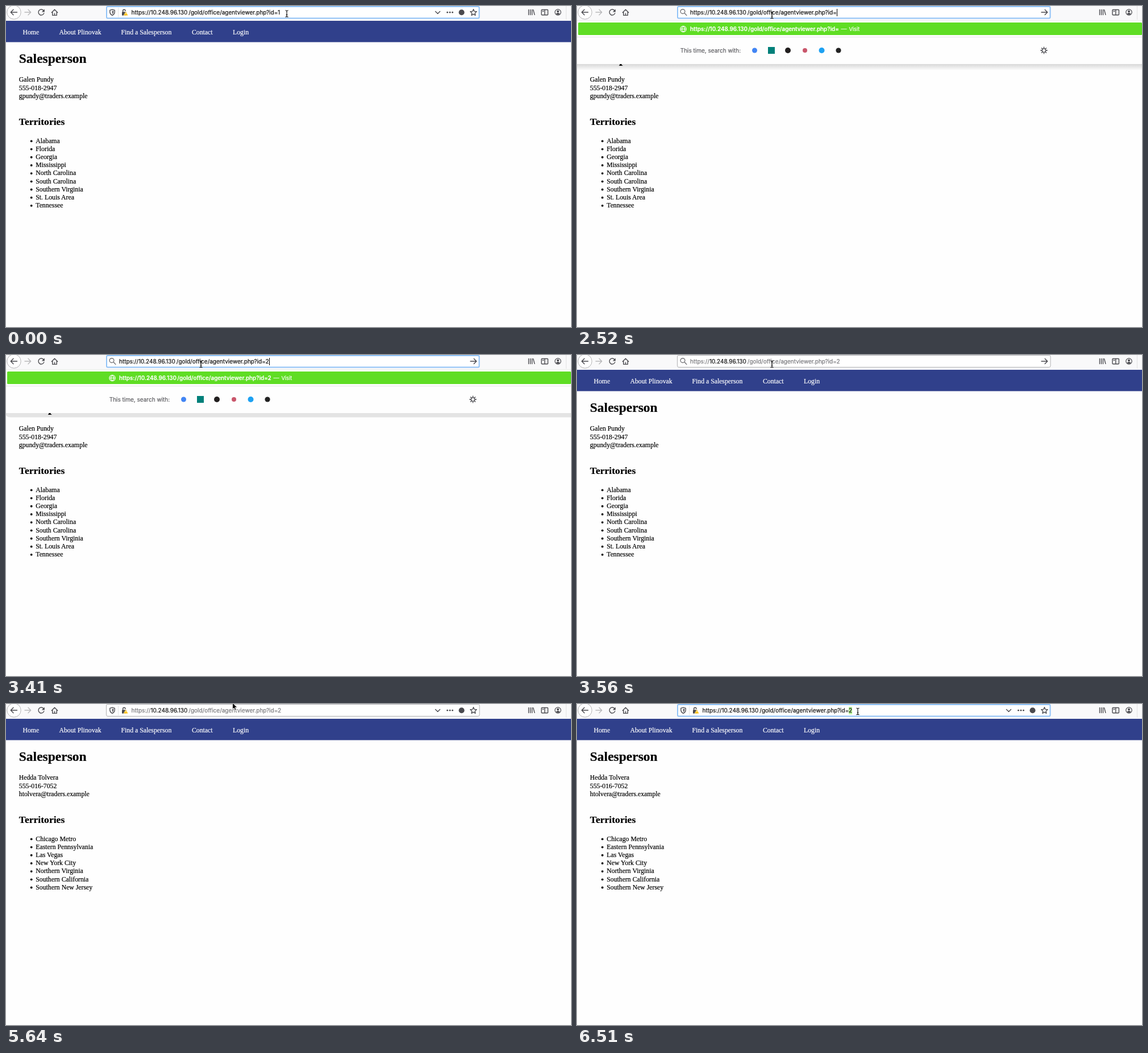
An HTML page for the animation above (8000 ms loop, 994 by 564 pixels).

```html
<!DOCTYPE html>
<html lang="en">
<head>
<meta charset="utf-8">
<title>Salesperson</title>
<style>
  html, body { margin: 0; width: 100%; height: 100%; overflow: hidden; background: #fff; }
  svg { display: block; }
  text { white-space: pre; stroke-width: .2; }
  .page { font: 11.76px "Liberation Serif", "Times New Roman", serif; stroke: #000; }
  .ui { font: 10px Inter, sans-serif; }
  .strong { font-size: 9.8px; font-weight: 600; }
  .line { fill: none; stroke: #4a4a4f; stroke-width: 1.4; stroke-linecap: round; stroke-linejoin: round; }
</style>
</head>
<body>
<svg id="stage" width="994" height="564" viewBox="0 0 994 564"></svg>
<script>
const LOOP = 8000;
const INK = '#111', ICON = '#4a4a4f';
const stage = document.getElementById('stage');

const people = [
  { name: 'Galen Pundy', phone: '555-018-2947', mail: 'gpundy@traders.example',
    areas: ['Alabama', 'Florida', 'Georgia', 'Mississippi', 'North Carolina', 'South Carolina',
      'Southern Virginia', 'St. Louis Area', 'Tennessee'] },
  { name: 'Hedda Tolvera', phone: '555-016-7052', mail: 'htolvera@traders.example',
    areas: ['Chicago Metro', 'Eastern Pennsylvania', 'Las Vegas', 'New York City',
      'Northern Virginia', 'Southern California', 'Southern New Jersey'] }
];

// Each step overrides the state left by the steps before it.
const steps = [
  [0, { person: 0, id: '1', mode: 'site', focus: true, button: 'reload', cursor: [494, 13.5],
        panel: 0, caret: false, mark: '', hover: true }],
  [1340, { cursor: [385, 13.5] }],
  [1490, { cursor: [289.3, 15] }],
  [1630, { cursor: [343, 16] }],
  [2520, { mode: 'typing', id: '', panel: 1, caret: true, shadow: 'soft' }],
  [2670, { panel: 5 }],
  [2810, { panel: 1, id: '2', caret: false, shadow: 'firm' }],
  [3410, { caret: true }],
  [3560, { panel: 0, caret: false, focus: false }],
  [3700, { button: 'stopSmall' }],
  [3850, { button: 'stop', mode: 'site' }],
  [4000, { button: 'stopDim', person: 1 }],
  [4150, { button: 'stopFade' }],
  [4300, { button: 'reloadDim' }],
  [4440, { button: 'reloadMid' }],
  [4590, { button: 'reload' }],
  [5640, { cursor: [398.5, -2], pointer: true }],
  [5780, { cursor: null, hover: false }],
  [5930, { cursor: [477, 6.5], pointer: false, hover: true }],
  [6080, { cursor: [491.5, 12.5] }],
  [6220, { focus: true }],
  [6370, { cursor: [494, 13], mark: 'all' }],
  [6510, { mark: 'id' }]
];
const states = [];
steps.forEach(([, change], i) => states.push({ ...states[i - 1], ...change }));

const rect = (x, y, w, h, fill, more = '') =>
  `<rect x="${x}" y="${y}" width="${w}" height="${h}" fill="${fill}" ${more}/>`;
const dot = (x, y, r, fill, more = '') => `<circle cx="${x}" cy="${y}" r="${r}" fill="${fill}" ${more}/>`;
const line = (d, more = '') => `<path class="line" d="${d}" ${more}/>`;
const label = (x, y, s, more = '') => `<text x="${x}" y="${y}" ${more}>${s}</text>`;
const paint = color => `style="stroke:${color}"`;
const inked = color => `fill="${color}" stroke="${color}"`;

function address(x, y, id, colors, scale = 1, look = '') {
  const parts = [['https://', 0], ['10.248.96.130', 34], ['/gold/office/agentviewer.php', 100.8],
    ['?id=', 237.5], [id, 257.5]];
  return `<text y="${y}" class="ui ${look}">` + parts.map(([s, dx], i) =>
    `<tspan x="${x + dx * scale}" ${inked(colors[i === 1 ? 1 : 0])}>${s}</tspan>`).join('') + '</text>';
}

function page(person) {
  const nav = [['Home', 29.5], ['About Plinovak', 93.5], ['Find a Salesperson', 202.5],
    ['Contact', 327], ['Login', 399]];
  const rows = person.areas.map((s, i) => {
    const y = 240.6 + i * 14.18;
    return dot(44.7, y - 3.2, 1.9, '#000', 'stroke="none"') + label(52.3, y, s);
  }).join('');
  return rect(0, 26, 994, 37.5, '#30408b') + '<g class="page">' +
    nav.map(([s, x]) => label(x, 49.5, s, inked('#fff'))).join('') +
    label(22.8, 99.6, 'Salesperson', 'font-size="23.5" font-weight="700"') +
    [person.name, person.phone, person.mail].map((s, i) => label(22.8, 133.4 + i * 14.1, s)).join('') +
    label(22.8, 209.4, 'Territories', 'font-size="17.6" font-weight="700"') + rows + '</g>';
}

function loadButton(kind) {
  const stop = (r, color) => line(`M${62 - r} ${11 - r}l${2 * r} ${2 * r}M${62 + r} ${11 - r}l${-2 * r} ${2 * r}`, paint(color));
  const reload = (color, tip = color) =>
    line('M66.2 8.2A5 5 0 1 0 66.8 12.6', paint(color)) +
    `<path d="M67.8 5.6v5h-5z" fill="${tip}"/>`;
  return {
    reload: () => reload(ICON),
    reloadMid: () => reload(ICON, '#a8a8aa'),
    reloadDim: () => reload('#a8a8aa', '#d8d8da'),
    stop: () => stop(4.5, ICON),
    stopSmall: () => stop(3.2, '#77777b'),
    stopDim: () => stop(4.5, '#b9b9bb'),
    stopFade: () => stop(3.2, '#cfcfd1')
  }[kind]();
}

function toolbar(s) {
  return rect(0, 0, 994, 26, '#f9f9fa') + rect(985, 0, 1, 24, '#e3e3e5') +
    dot(14, 11, 12.2, '#fff', 'stroke="#b4b4b6"') +
    line('M19.5 11H8.5M13 6.3L8.3 11l4.7 4.7') +
    line('M33 11h10.5M39 6.3l4.7 4.7l-4.7 4.7', paint('#b9b9bb')) + loadButton(s.button) +
    line('M80.3 11.4L85.5 6.2l5.2 5.2M81.8 11v5.4h7.4V11M85.5 16v-3') +
    line('M919.5 6.5v9M922.5 6.5v9M925.5 6.5v9M927.6 6.8l2.3 8.6') +
    line('M943 6.5h9.4q1 0 1 1v7.2q0 1-1 1H943q-1 0-1-1V7.500q0-1 1-1zM947.8 7v8.500M944.2 9.200h1.600', 'stroke-width="1.2"') +
    dot(971, 11, 5.2, 'none', `stroke="${ICON}" stroke-width="1.2"`) +
    dot(971, 9.4, 2, ICON) + `<path d="M967.3 13.7q3.7-3.6 7.4 0q-3.7 3.4-7.4 0" fill="${ICON}"/>`;
}

function siteIcons() {
  const star = Array.from({ length: 10 }, (_, i) => {
    const a = i * Math.PI / 5, r = i % 2 ? 2.7 : 5.9;
    return `${(822.4 + r * Math.sin(a)).toFixed(2)} ${(11.6 - r * Math.cos(a)).toFixed(2)}`;
  }).join('L');
  return line('M187 6.2l4.2 1.2v3.2q-.3 4-4.2 5.8q-3.9-1.8-4.2-5.8V7.4z', 'stroke-width="1.2"') +
    `<path d="M187 8.2v6q2-1.4 2.2-4V8.8z" fill="${ICON}"/>` + rect(197, 3, 1, 17, '#e4e4e6') +
    rect(204, 10.3, 8, 6.4, ICON, 'rx="1"') + line('M205.6 10V8.4a2.2 2.2 0 0 1 4.4 0') +
    '<path d="M210.8 9.6l4 7.2h-8z" fill="#ffbf00" stroke="#fff" stroke-width=".5"/>' +
    rect(210.4, 12, .9, 2.6, '#fff') +
    line('M755.5 9.5l4 4l4-4') + [776.5, 781, 785.5].map(x => dot(x, 11.2, 1.4, ICON)).join('') +
    dot(801.5, 11.3, 5, ICON) + line(`M${star}Z`, 'stroke-width="1.2"');
}

function urlBar(s) {
  const site = s.mode === 'site', x = site ? 220.5 : 199;
  const border = s.focus ? '#8fc2f7' : s.hover ? '#b0b0b2' : '#cccccd';
  const frame = s.focus
    ? rect(177, 1, 655.5, 20.4, '#fff', `rx="2" stroke="${border}" stroke-width="2"`)
    : rect(176.5, .5, 656.5, 21, '#fff', `rx="2.5" stroke="${border}"`);
  const mark = { all: [220.5, 263.5], id: [478, 6] }[s.mark];
  return frame + (mark ? rect(mark[0], 5, mark[1], 13, '#b9f49b') : '') +
    (site ? siteIcons()
      : line('M189.2 12.6l3.6 3.8', paint('#77777b')) +
        dot(186, 9.6, 3.9, 'none', 'stroke="#77777b" stroke-width="1.4"') +
        line('M817 11h10.5M823.2 6.5l4.5 4.5l-4.5 4.5')) +
    address(x, 15.4, s.id, s.focus ? [INK, INK] : ['#77777b', INK]) +
    (s.caret ? rect(s.id ? 463 : 457, 5, 1, 13, '#000') : '');
}

const globe = (y, color) => line(
  `M181.8 ${y}a5.2 5.2 0 1 0 10.4 0a5.2 5.2 0 1 0-10.4 0h10.4M187 ${y - 5.2}q-5 5.2 0 10.4q5-5.2 0-10.4`,
  `style="stroke:${color};stroke-width:1.1"`);

function panel(s) {
  if (!s.panel) return '';
  const drop = (s.panel - 1) * 23.75, bottom = 102 + drop;
  const shadow = s.shadow === 'firm'
    ? `<path d="M0 ${bottom}H994v7.5H8q-6 0-8-4z" fill="#000" opacity=".1"/>`
    : rect(0, bottom, 994, 10, 'url(#fade)');
  let rows = '';
  for (let i = 1; i < s.panel; i++) {
    const y = 40.8 + i * 23.75;
    rows += globe(y, '#77777b') + label(199, y + 3.6, 'Salesperson —', `class="ui" ${inked(INK)}`) +
      address(275, y + 3.6, i, ['#4a9a20', '#4a9a20']);
  }
  const spokes = Array.from({ length: 8 }, (_, i) =>
    `<path d="M821.5 74.6v-2.4" class="line" transform="rotate(${i * 45} 821.5 78)"/>`).join('');
  const engines = dot(312.5, 78, 4.5, '#4285f4') + rect(336, 72, 12, 12, '#00807a') +
    dot(371, 78, 5, '#221f1f') + dot(401, 78, 4, '#c9566b') +
    dot(430.5, 78, 5, '#1da1f2') + dot(460, 78, 4.6, '#222');
  const tail = s.id ? 6 : 0;
  return shadow + rect(0, 25, 994, bottom - 25, '#fefefe') + rect(0, 25, 994, 1, '#ededee') +
    rect(2, 29, 992, 22, '#5fdd24', 'rx="1.5"') + globe(40.5, '#fff') +
    address(199, 44.2, s.id, ['#fff', '#fff'], 1.0155, 'strong') +
    label(464.5 + tail, 44.2, '—', `class="ui" ${inked('#fff')}`) +
    label(478.5 + tail, 44.2, 'Visit', `class="ui" ${inked('#fff')} style="font-size:9.2px"`) + rows +
    `<g transform="translate(0 ${drop})">` + rect(0, 54, 994, 1, '#e6e6e7') +
    label(181.7, 82, 'This time, search with:', `class="ui" ${inked('#5c5c60')}`) + engines +
    dot(821.5, 78, 3.2, 'none', `stroke="${ICON}" stroke-width="1.3"`) + spokes + '</g>';
}

function cursor(s) {
  if (!s.cursor) return '';
  const shape = s.pointer
    ? '<path d="M0 0v11.3l2.6-2.4l1.8 3.9l1.9-.9l-1.8-3.8h3.7z" fill="#000" stroke="#fff" stroke-width=".8"/>'
    : '<path d="M-2.6-5.8Q-.2-5.8 0-4.6Q.2-5.8 2.6-5.8M0-4.8V4.8M-2.6 5.8Q-.2 5.8 0 4.6Q.2 5.8 2.6 5.8M-1.3 2h2.6" fill="none" stroke="#000" stroke-width="1.1"/>';
  return `<g transform="translate(${s.cursor})">${shape}</g>`;
}

const defs = `<defs><linearGradient id="fade" x2="0" y2="1">
  <stop stop-color="#000" stop-opacity=".15"/><stop offset="1" stop-color="#000" stop-opacity=".02"/>
</linearGradient></defs>`;

let shown = -1;
function draw(now) {
  const time = now % LOOP;
  const index = steps.filter(([start]) => start <= time).length - 1;
  if (index !== shown) {
    const s = states[index];
    stage.innerHTML = defs + rect(0, 0, 994, 564, '#fefefe') + page(people[s.person]) +
      toolbar(s) + panel(s) + urlBar(s) + cursor(s);
    shown = index;
  }
}

const begin = performance.now();
function tick() {
  draw(performance.now() - begin);
  requestAnimationFrame(tick);
}
tick();
</script>
</body>
</html>
```
